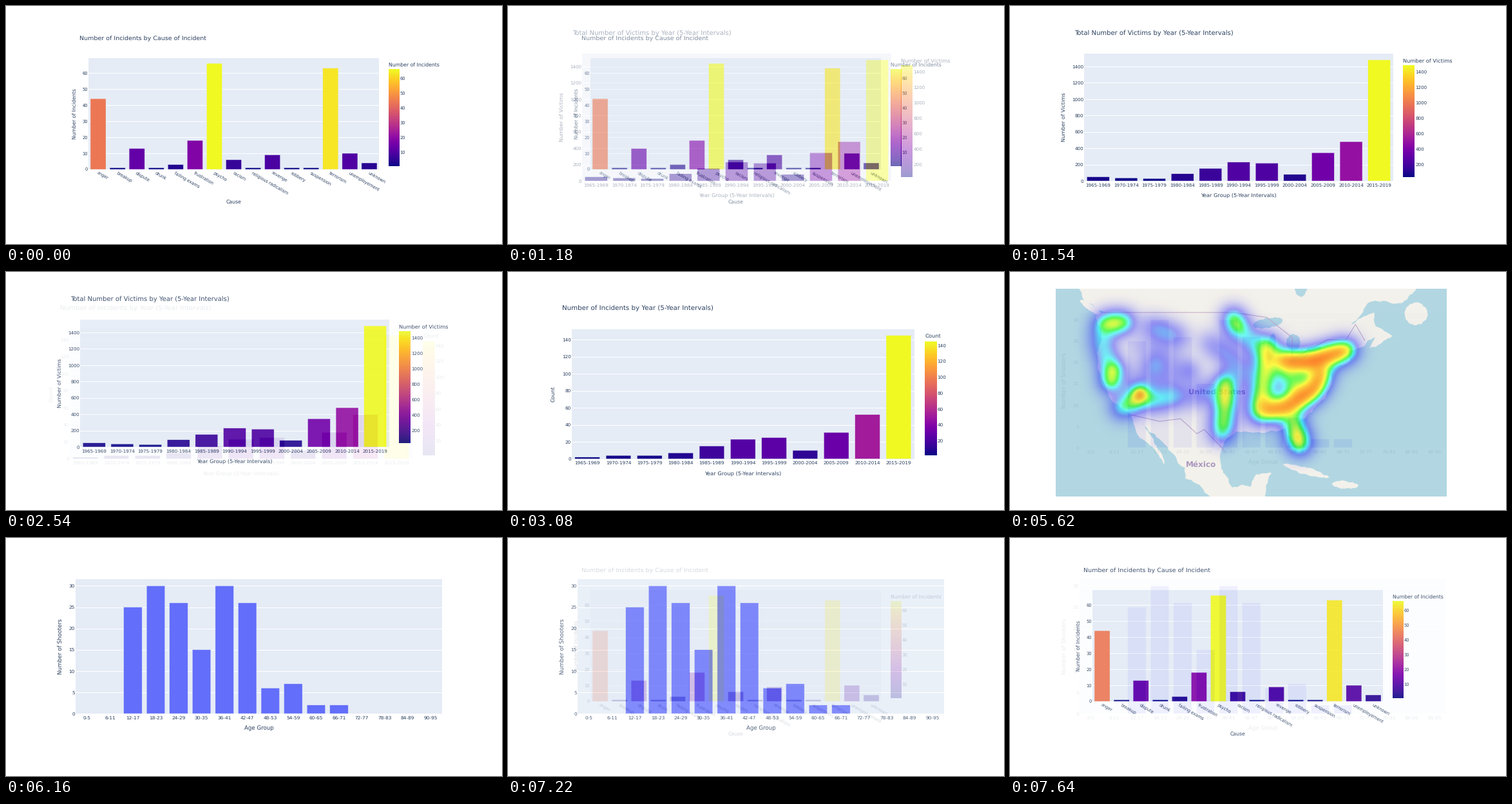
These frames come from a looping animation (770 by 370 pixels, 7.7 s). A matplotlib script:

```python
import numpy as np
import matplotlib.pyplot as plt
from matplotlib.animation import FuncAnimation
from matplotlib.colors import LinearSegmentedColormap
from matplotlib.patches import Polygon, Rectangle

W, H = 770, 370
TICK_MS = 20
HOLD_MS, STEP_MS, STEPS = 1000, 60, 10
SCENE_MS = HOLD_MS + (STEPS - 1) * STEP_MS

INK, PANEL, BLUE = "#2a3f5f", "#e5ecf6", "#636efa"
WATER, LAND, BORDER, LABEL = "#aad3df", "#f2efe9", "#c0a8c2", "#a08cb8"
PLASMA = plt.get_cmap("plasma")

plt.rcParams["font.family"] = "DejaVu Sans"
plt.rcParams["text.hinting"] = "none"
fig = plt.figure(figsize=(W / 100, H / 100), dpi=100, facecolor="white")
ax = fig.add_axes([0, 0, 1, 1])
rng = np.random.default_rng(4)


def reset():
    ax.clear()
    ax.set_axis_off()


def fit():
    ax.set_xlim(0, W)
    ax.set_ylim(H, 0)
    ax.set_aspect("auto")


def text(x, y, s, px, ha="left", rot=0, color=INK, **kw):
    """Place text with its capitals centred on y (or on x when upright)."""
    shift = 0.36 * px
    if rot == 90:
        x += shift
    elif rot == 0:
        y += shift
    ax.text(x, y, s, fontsize=px * 0.72, ha=ha, va="baseline", color=color,
            rotation=rot, rotation_mode="anchor", **kw)


# ---------- bar charts ----------

def colorbar(box, em, title, step, lo, hi):
    x0, y0, x1, y1 = box
    left = x1 + 0.02 * (x1 - x0) + 0.83 * em
    right = left + 2.5 * em
    top, bottom = y0 + 2.68 * em, y1 - 0.8 * em
    ax.imshow(np.linspace(1, 0, 64)[:, None], cmap=PLASMA, aspect="auto",
              extent=(left, right, bottom, top), zorder=2)
    text(left, top - 1.1 * em, title, em * 7 / 6)
    for v in range(step, hi, step):
        y = bottom - (v - lo) / (hi - lo) * (bottom - top)
        text(right + 0.2 * em, y, str(v), em)


def chart(box, em, step, labels, values, xlab, ylab,
          title=None, bar=None, tilt=False):
    """Bar chart whose margins all follow from the tick text size em."""
    x0, y0, x1, y1 = box
    lo, hi = min(values), max(values)
    slot = (x1 - x0) / len(values)
    unit = 0.95 * (y1 - y0) / hi
    ax.add_patch(Rectangle((x0, y0), x1 - x0, y1 - y0, fc=PANEL, lw=0))
    for v in range(0, hi + 1, step):
        y = y1 - v * unit
        ax.plot([x0, x1], [y, y], color="white", lw=0.72, zorder=1)
        text(x0 - 1, y, str(v), em, "right")
    for i, (name, v) in enumerate(zip(labels, values)):
        mid = x0 + (i + 0.5) * slot
        if v:
            color = PLASMA((v - lo) / (hi - lo)) if bar else BLUE
            ax.add_patch(Rectangle((mid - 0.4 * slot, y1 - v * unit),
                                   0.8 * slot, v * unit, fc=color, ec=PANEL,
                                   lw=0.3, snap=False, zorder=2))
        if tilt:
            text(mid - 0.37 * em, y1 + 1.05 * em, name, em, rot=-30)
        else:
            text(mid, y1 + 0.83 * em, name, em, "center")

    digits = len(str(hi // step * step))
    text((x0 + x1) / 2, y1 + (7.6 if tilt else 2.95) * em, xlab, em * 7 / 6,
         "center")
    text(x0 - (0.636 * digits + 2.02) * em, (y0 + y1) / 2, ylab, em * 7 / 6,
         "center", 90)
    if title:
        text(x0 - 2.05 * em, y0 - 4.55 * em, title, em * 17 / 12)
    if bar:
        colorbar(box, em, bar, step, lo, hi)


def causes():
    names = ("anger,breakup,dispute,drunk,failing exams,frustration,psycho,"
             "racism,religious radicalism,revenge,robbery,suspension,"
             "terrorism,unemployement,unknown").split(",")
    chart((128, 80.5, 579, 254), 6.68, 10, names,
          [44, 1, 13, 1, 3, 18, 66, 6, 1, 9, 1, 1, 63, 10, 4],
          "Cause", "Number of Incidents",
          "Number of Incidents by Cause of Incident",
          "Number of Incidents", tilt=True)


YEARS = [f"{y}-{y + 4}" for y in range(1965, 2020, 5)]
YEAR_AXIS = "Year Group (5-Year Intervals)"


def victims():
    chart((115, 74, 595, 272), 7.08, 200, YEARS,
          [50, 37, 30, 88, 153, 230, 218, 80, 345, 480, 1480],
          YEAR_AXIS, "Number of Victims",
          "Total Number of Victims by Year (5-Year Intervals)",
          "Number of Victims")


def incidents():
    chart((99, 88.5, 630.5, 290.5), 7.23, 20, YEARS,
          [2, 4, 4, 7, 15, 23, 25, 10, 31, 52, 145],
          YEAR_AXIS, "Count",
          "Number of Incidents by Year (5-Year Intervals)", "Count")


def ages():
    names = [f"{a}-{a + 5}" for a in range(0, 96, 6)]
    counts = [0, 0, 25, 30, 26, 15, 30, 26, 6, 7, 2, 2, 0, 0, 0, 0]
    chart((108, 64, 677, 273), 7.35, 5, names, counts,
          "Age Group", "Number of Shooters")


# ---------- heat map ----------

# Key shore points (lon, lat); roughening fills in the rest
WEST_COAST = [
    (-130, 56), (-127.5, 51), (-122.8, 49), (-124.7, 48.3), (-124.3, 41),
    (-120.6, 34.5), (-117.1, 32.5), (-114.7, 28), (-110, 23), (-111.3, 26),
    (-114.8, 31.5), (-111, 28), (-105.6, 22.5), (-105.5, 20.3),
    (-96.5, 15.7), (-92, 14)]
EAST_COAST = [
    (-83.2, 14), (-83.5, 15.5), (-88.5, 15.8), (-87, 21.4), (-90.3, 21.1),
    (-91.5, 18.6), (-95.5, 18.5), (-97.8, 22.4), (-97.2, 27.5),
    (-94.5, 29.4), (-89.3, 29.2), (-84, 30), (-82.7, 28), (-81, 25.2),
    (-80.2, 26.5), (-81.4, 31), (-75.6, 35.3), (-74, 40.5), (-70.2, 41.7),
    (-70.5, 43.3), (-64.8, 45.4), (-66, 43.7), (-61, 45.6), (-64.7, 47),
    (-65, 49), (-70, 47.2), (-66.5, 50.2), (-59, 50.3), (-55.6, 52.5),
    (-56, 56)]
NORTH_BORDER = [(-122.8, 49), (-95.2, 49), (-88, 48.3), (-82.5, 45.3),
                (-82.6, 42), (-75, 45), (-71, 45), (-69, 47.3), (-67, 44.9)]
SOUTH_BORDER = [(-117.1, 32.5), (-111, 31.3), (-106.5, 31.8), (-103, 29),
                (-101.4, 29.8), (-97.2, 25.9)]

# Ellipses: lon, lat, half width, half height, tilt
ISLANDS = [(-125.8, 49.7, 20, 5, 35), (-56, 48.8, 18, 18, 0),
           (-79.5, 21.8, 38, 5, 16), (-71.2, 19, 21, 6, 4)]
LAKES = [(-87.8, 47.5, 24, 8, -10), (-87, 43.9, 6, 22, 8),
         (-82.3, 44.6, 11, 13, 0), (-81, 42.2, 16, 4, -20),
         (-77.9, 43.6, 12, 4, -5), (-80.7, 53, 11, 22, 0)]

# Heat trails: strength, then the path its spots follow
TRAILS = [
    (.53, (146, 82), (178, 79)), (.25, (140, 102), (151, 138)),
    (.62, (160, 153), (157, 172)), (.78, (202, 191)),
    (.48, (191, 204), (173, 212)), (.36, (222, 201), (258, 194)),
    (.25, (218, 86), (262, 102)), (.35, (224, 146)), (.35, (278, 155)),
    (.52, (346, 72), (353, 86)), (.27, (364, 98), (388, 118)),
    (.2, (308, 110), (345, 135), (362, 160)), (.18, (285, 195), (306, 185)),
    (.55, (335, 172), (334, 204)), (.45, (333, 222), (329, 252)),
    (.47, (402, 114), (395, 160), (386, 222)),
    (.63, (424, 138), (458, 142), (524, 122)),
    (.6, (484, 160), (472, 184), (428, 212), (404, 216)),
    (.3, (428, 160), (444, 182)),
    (.52, (441, 236), (450, 270)), (.3, (448, 264)),
    (.09, (200, 115), (250, 130), (250, 172), (200, 160))]


def project(points):
    lon, lat = np.array(points, float).T
    return np.column_stack([
        1035.8 + 7.24 * lon,
        471 - 414.8 * np.arcsinh(np.tan(np.radians(lat)))])


def rough(pts, passes, amount=0.12):
    """Midpoint displacement for a natural shoreline."""
    for _ in range(passes):
        d = np.diff(pts, axis=0)
        push = rng.uniform(-amount, amount, (len(d), 1))
        mid = pts[:-1] + d / 2 + push * np.column_stack([-d[:, 1], d[:, 0]])
        out = np.empty((2 * len(pts) - 1, 2))
        out[::2], out[1::2] = pts, mid
        pts = out
    return pts


def ellipse(lon, lat, rx, ry, tilt):
    a, t = np.linspace(0, 2 * np.pi, 13), np.radians(tilt)
    x, y = rx * np.cos(a), ry * np.sin(a)
    return project([(lon, lat)]) + np.column_stack([
        x * np.cos(t) - y * np.sin(t), x * np.sin(t) + y * np.cos(t)])


def spaced(path, gap):
    """Points at an even gap along a path."""
    p = np.array(path, float)
    s = np.r_[0, np.cumsum(np.hypot(*np.diff(p, axis=0).T))]
    at = np.linspace(0, s[-1], round(s[-1] / gap) + 1)
    return np.column_stack([np.interp(at, s, c) for c in p.T])


def heat_layer(sigma=15):
    yy, xx = np.mgrid[0:H, 0:W] + 0.5
    clear = np.ones((H, W))
    for strength, *path in TRAILS:
        for x, y in spaced(path, sigma):
            d2 = (xx - x) ** 2 + (yy - y) ** 2
            clear *= 1 - strength * np.exp(-d2 / (2 * sigma ** 2))
    ramp = LinearSegmentedColormap.from_list("heat", [
        (0, "blue"), (0.4, "blue"), (0.6, "cyan"), (0.7, "lime"),
        (0.8, "yellow"), (1, "red")])
    rgba = ramp(1 - clear)
    rgba[..., 3] = 1 - clear
    return rgba


def heatmap():
    sea = ax.add_patch(Rectangle((71, 26), 606.5, 322.5, fc=WATER, lw=0))

    def area(pts, color, passes=2):
        patch = ax.add_patch(Polygon(rough(pts, passes), fc=color, lw=0))
        patch.set_clip_path(sea)

    area(project(WEST_COAST + EAST_COAST), LAND, 4)
    for shapes, color in ((ISLANDS, LAND), (LAKES, WATER)):
        for shape in shapes:
            area(ellipse(*shape), color)
    for border in (NORTH_BORDER, SOUTH_BORDER):
        ax.plot(*project(border).T, color=BORDER, lw=0.8)
    text(321, 186, "United States", 11.5, "center", color=LABEL, weight="bold")
    text(297, 299, "México", 12, "center", color=LABEL, weight="bold")
    heat = ax.imshow(heat_layer(), extent=(0, W, H, 0), zorder=5,
                     interpolation="nearest")
    heat.set_clip_path(sea)


# ---------- slideshow ----------

def snapshot(draw):
    reset()
    draw()
    fit()
    fig.canvas.draw()
    return np.asarray(fig.canvas.buffer_rgba())[..., :3].astype(np.float32)


slides = [snapshot(s) for s in (causes, victims, incidents, heatmap, ages)]
reset()
screen = ax.imshow(slides[0].astype(np.uint8), extent=(0, W, H, 0),
                   interpolation="nearest")
fit()


def update(i):
    n, t = divmod(i * TICK_MS, SCENE_MS)
    k = 0 if t < HOLD_MS else (t - HOLD_MS) // STEP_MS + 1
    now, then = slides[n % len(slides)], slides[(n + 1) % len(slides)]
    mixed = now + (then - now) * (k / STEPS)
    screen.set_data(np.rint(mixed).astype(np.uint8))
    return [screen]


anim = FuncAnimation(fig, update, frames=len(slides) * SCENE_MS // TICK_MS,
                     interval=TICK_MS, repeat=True, repeat_delay=0)
plt.show()
```
